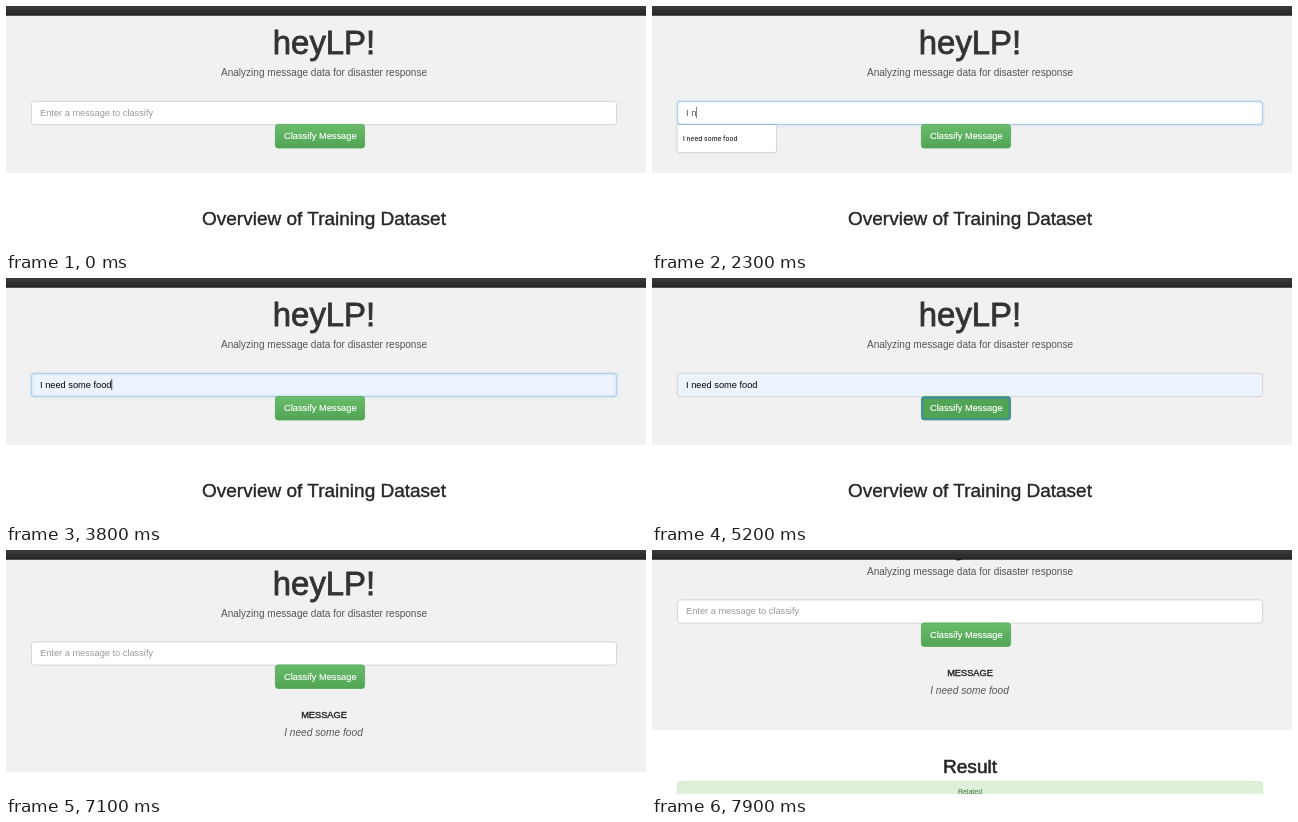
These frames come from a looping animation (640x244 px, 8000 ms). An HTML page:

```html
<!DOCTYPE html>
<html lang="en">
<head>
<meta charset="utf-8">
<title>heyLP!</title>
<style>
  html, body { margin: 0; width: 100%; height: 100%; overflow: hidden; background: #fff; }
  svg { display: block; width: 640px; height: 244px; }
  text { font-family: "Liberation Sans", Arial, sans-serif; font-size: 9.25px; fill: #333; white-space: pre; }
  .mid { text-anchor: middle; }
  .medium { fill: #262626; stroke: #262626; stroke-width: .4px; }
  .lead { font-size: 10.05px; fill: #555; }
  #menu text { font: 500 6.6px Inter, sans-serif; fill: #222; }
  #menu { filter: drop-shadow(0 .7px .8px rgba(0, 0, 0, .3)); }
  #glow { fill: none; stroke: #a3cdee; stroke-width: .8px; filter: drop-shadow(0 0 1.5px rgba(102, 175, 233, .6)); }
  #label { fill: #fff; stroke: #fff; stroke-width: .15px; }
</style>
</head>
<body>
<svg viewBox="0 0 640 244">
  <defs>
    <linearGradient id="nav" x2="0" y2="1"><stop stop-color="#3a3a3a"/><stop offset="1" stop-color="#282828"/></linearGradient>
    <linearGradient id="green" x2="0" y2="1"><stop stop-color="#69bc6a"/><stop offset="1" stop-color="#50a454"/></linearGradient>
  </defs>
  <g id="page">
    <rect id="banner" width="640" fill="#f1f1f1"/>
    <text class="mid medium" x="318" y="48.3" style="font-size:32.9px;fill:#333;stroke:#333;stroke-width:.8px">heyLP!</text>
    <text class="mid lead" x="318" y="70">Analyzing message data for disaster response</text>

    <rect id="input" x="25.4" y="95.4" width="585.2" height="23.2" rx="2.8" stroke="#ccc" stroke-width=".8"/>
    <rect id="glow" x="25.4" y="95.4" width="585.2" height="23.2" rx="2.8"/>
    <text id="value" x="34" y="109.9"></text>
    <rect id="caret" y="101" width=".7" height="11"/>

    <rect id="button" x="269.4" y="118.4" width="89.2" height="23.6" rx="2.8" stroke="#55a858" stroke-width=".8"/>
    <rect id="ring" x="270.3" y="119.6" width="87.4" height="21.4" rx="2" fill="none" stroke="#3f86b0" stroke-width="1.6"/>
    <text id="label" class="mid" x="314.3" y="133.4">Classify Message</text>
    <g id="menu"></g>

    <g id="overview">
      <text class="mid medium" x="318" y="219.2" style="font-size:19px">Overview of Training Dataset</text>
    </g>
    <g id="result">
      <text class="mid medium" x="318" y="171">MESSAGE</text>
      <text class="mid lead" x="317.5" y="189.5" style="font-size:10.2px;font-style:italic">I need some food</text>
      <text class="mid medium" x="318" y="268.5" style="font-size:19.1px;stroke-width:.6px">Result</text>
      <rect x="25.4" y="277" width="585.2" height="21" rx="2.8" fill="#dff0d8" stroke="#d0e6c2" stroke-width=".7"/>
      <text class="mid" x="318" y="289.9" style="font-size:7px;fill:#3c763d">Related</text>
    </g>
  </g>
  <rect width="640" height="9" fill="url(#nav)"/>
  <rect y="8.8" width="640" height=".9" fill="#111"/>
</svg>
<script>
const LOOP = 8000, TICK = 100;
const $ = id => document.getElementById(id);
const set = (id, name, value) => $(id).setAttribute(name, value);
const show = (id, on) => set(id, 'visibility', on ? 'visible' : 'hidden');
const between = (t, from, to) => t >= from && t < to;

// Value of the last [time, value] step that has begun
const stepAt = (t, steps) => steps.filter(([start]) => start <= t).pop()[1];

const message = 'I need some food';
const history = [message, 'I am trapped here now', 'It is raining heavily', 'Is there water near me', 'We need medicine', 'Please send help'];
const menuWidth = { 1: 98.6, 2: 106, 4: 118, 6: 118 };
const typed = [[0, ''], [1900, 'I'], [2100, 'I '], [2300, 'I n'], [2400, 'I ne'], [2600, 'I nee'],
  [2700, 'I need'], [3200, message], [6000, '']];
const menuSize = [[0, 0], [1200, 6], [1900, 4], [2100, 2], [2300, 1], [3800, 0]];
const focus = [[0, 0], [1100, .4], [1200, 1], [5000, .7], [5100, .25], [5200, 0]];
const caretOn = [[0, 0], [1100, 1], [1600, 0], [1900, 1], [3200, 0], [3800, 1], [4300, 0], [4800, 1], [5000, 0]];
const scroll = [[0, 0], [7100, 3.5], [7200, 9], [7300, 12], [7500, 22], [7600, 31.5], [7700, 37.5],
  [7800, 42], [7900, 45.5]];

function menuMarkup(count, picked) {
  if (!count) return '';
  const row = 18.6, left = 25.4, top = 123.2, width = menuWidth[count];
  const items = history.slice(0, count).map((item, i) => `<text x="31" y="${top + row * i + 11.6}">${item}</text>`);
  const highlight = picked ? `<rect x="${left}" y="${top}" width="${width}" height="${row}" fill="#e6e6e6"/>` : '';
  return `<rect x="${left}" y="119" width="${width}" height="${row * count + 8.4}" rx="1.5" fill="#fff"/>${highlight}${items.join('')}`;
}

function draw(t) {
  const text = stepAt(t, typed), filled = text === message, loaded = t >= 6000;
  const ink = filled ? '#000' : text ? '#555' : '#999';
  set('page', 'transform', `translate(0 ${-stepAt(t, scroll)})`);
  set('banner', 'height', loaded ? 225.5 : 167);
  show('overview', !loaded);
  show('result', loaded);

  set('input', 'fill', filled ? '#ebf3fd' : '#fff');
  set('glow', 'opacity', stepAt(t, focus));
  $('value').textContent = text || 'Enter a message to classify';
  $('value').style.fill = ink;
  set('caret', 'x', 34 + (text ? $('value').getComputedTextLength() : 0));
  set('caret', 'fill', ink);
  show('caret', stepAt(t, caretOn));

  set('button', 'fill', between(t, 4500, 6000) ? '#50a454' : 'url(#green)');
  show('ring', between(t, 5000, 6000));
  $('menu').innerHTML = menuMarkup(stepAt(t, menuSize), t >= 3200);
}

const start = performance.now();
let last = -1;
function frame() {
  const t = Math.floor((performance.now() - start) % LOOP / TICK) * TICK;
  if (t !== last) draw(last = t);
  requestAnimationFrame(frame);
}
frame();
</script>
</body>
</html>
```
